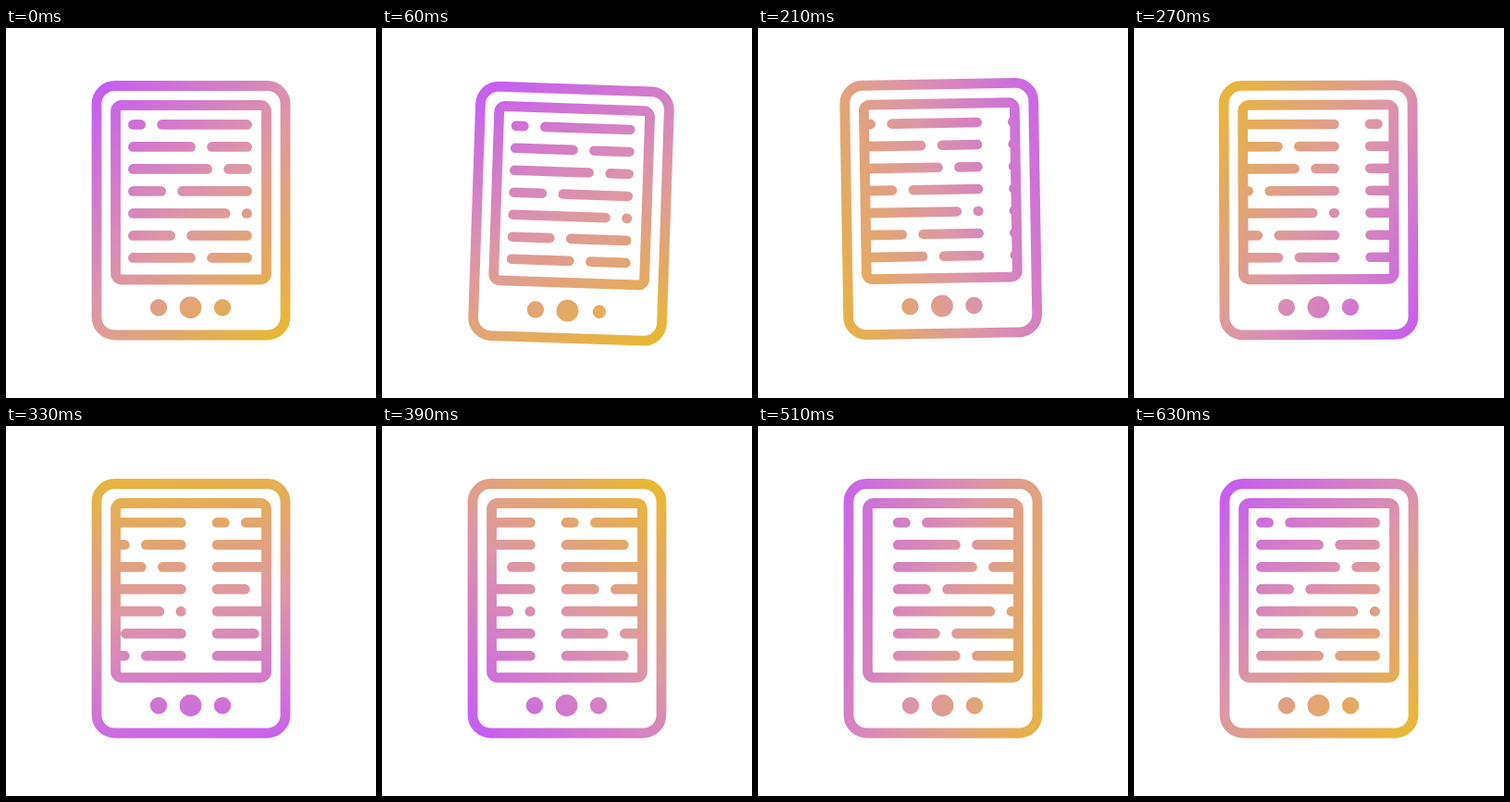
Write an HTML page with a canvas that moves like this. It is 400 by 400 pixels and loops after 1.66 s.

```html
<!DOCTYPE html>
<html lang="en">
<head>
<meta charset="utf-8">
<title>E-reader</title>
<style>
  html, body { margin: 0; height: 100%; overflow: hidden; background: #fff; }
  canvas { display: block; }
</style>
</head>
<body>
<canvas id="stage" width="400" height="400"></canvas>
<script>
const ctx = document.getElementById("stage").getContext("2d");
const LOOP = 1660, STEP = 30, END = 630;
const PAGE = 162;                                // distance between two pages of text
const PIVOT = [100, 332];
const LEFT = 132, RIGHT = 266, GAP = 12.3, LINE = 10.6;
const breaks = [151, 205, 223, 173, 242.5, 183, 205]; // end of the first bar in each row

const smooth = p => { p = Math.min(1, Math.max(0, p)); return p * p * (3 - 2 * p); };

// Eased interpolation through [time, value] keys
function keyed(t, keys) {
  let value = keys[0][1];
  for (let i = 1; i < keys.length; i++) {
    const [t0, v0] = keys[i - 1], [t1, v1] = keys[i];
    if (t >= t0) value = v0 + (v1 - v0) * smooth((t - t0) / (t1 - t0));
  }
  return value;
}

function paint(angle) {
  const dx = 160 * Math.cos(angle), dy = 160 * Math.sin(angle);
  const g = ctx.createLinearGradient(200 - dx, 197 - dy, 200 + dx, 197 + dy);
  g.addColorStop(0, "#c75ff0");
  g.addColorStop(0.5, "#dd96a6");
  g.addColorStop(1, "#e8b736");
  return g;
}

function frame(x, y, w, h, r) {
  ctx.beginPath();
  ctx.roundRect(x, y, w, h, r);
  ctx.stroke();
}

function dot(x, y, r) {
  ctx.beginPath();
  ctx.arc(x, y, r, 0, 2 * Math.PI);
  ctx.fill();
}

function bar(x0, x1, y) {
  ctx.beginPath();
  ctx.roundRect(x0, y - LINE / 2, x1 - x0, LINE, LINE / 2);
  ctx.fill();
}

function page(shift) {
  breaks.forEach((end, row) => {
    const y = 104.4 + 24 * row;
    bar(LEFT + shift, end + shift, y);
    bar(end + GAP + shift, RIGHT + shift, y);
  });
}

function draw(t) {
  const tilt = keyed(t, [[0, 0], [100, 3], [200, -1], [300, 0]]);
  const press = keyed(t, [[0, 1], [100, 0.66], [200, 1]]);
  const scroll = -PAGE * smooth((t - 100) / 500);
  const turn = 2 * Math.PI * smooth((t / END) ** 0.87);

  ctx.clearRect(0, 0, 400, 400);
  ctx.save();
  ctx.translate(...PIVOT);
  ctx.rotate(tilt * Math.PI / 180);
  ctx.translate(-PIVOT[0], -PIVOT[1]);
  ctx.fillStyle = ctx.strokeStyle = paint(Math.PI / 4 + turn);
  ctx.lineWidth = 10.8;

  frame(98, 62.5, 204, 269.5, 19.5);
  frame(118.5, 83.5, 163, 188.5, 6.5);
  dot(165, 302.2, 9.2);
  dot(199.5, 302.2, 11.9);
  dot(234, 302.2, 9.2 * press);

  ctx.beginPath();
  ctx.rect(120, 85, 160, 185);
  ctx.clip();
  page(scroll);
  page(scroll + PAGE);
  ctx.restore();
}

function tick() {
  const t = performance.now() % LOOP;
  draw(Math.min(END, Math.floor(t / STEP) * STEP));
  requestAnimationFrame(tick);
}
tick();
</script>
</body>
</html>
```
